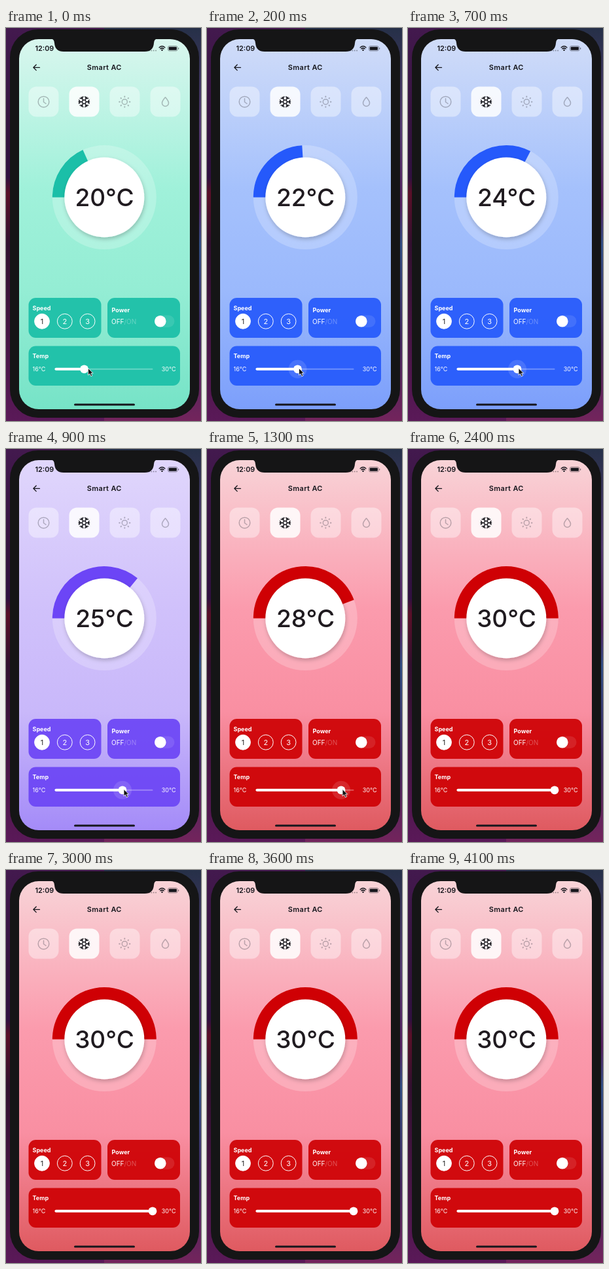
Write an HTML page that moves like this. It is 298x600 px and loops after 4.2 s.

```html
<!DOCTYPE html>
<html lang="en">
<head>
<meta charset="utf-8">
<title>Smart AC</title>
<style>
html, body { margin: 0; width: 100%; height: 100%; overflow: hidden; background: #241030; }
svg { display: block; width: 298px; height: 600px; font-family: Inter, Roboto, sans-serif; --main: #1bbfa8; }
.main { fill: var(--main); }
.card { fill: var(--main); fill-opacity: .92; }
.line { fill: none; stroke-linecap: round; stroke-linejoin: round; }
.bold { font-weight: 700; }
.mid { text-anchor: middle; }
.white { fill: #fff; }
.icon { stroke: #3c3c46; stroke-opacity: .34; stroke-width: 1.5; }
</style>
</head>
<body>
<svg viewBox="0 0 298 600">
  <defs>
    <linearGradient id="left" x2="0" y2="1">
      <stop offset="0" stop-color="#43194e"/><stop offset=".25" stop-color="#35133f"/>
      <stop offset=".38" stop-color="#301040"/><stop offset=".42" stop-color="#5a1028"/>
      <stop offset=".55" stop-color="#32102f"/><stop offset="1" stop-color="#5a1958"/>
    </linearGradient>
    <linearGradient id="right" x2="0" y2="1">
      <stop offset="0" stop-color="#263048"/><stop offset=".25" stop-color="#51386f"/>
      <stop offset=".45" stop-color="#54205f"/><stop offset=".55" stop-color="#304d82"/>
      <stop offset=".8" stop-color="#41255c"/><stop offset="1" stop-color="#73245c"/>
    </linearGradient>
    <linearGradient id="sky" x2="0" y2="1">
      <stop offset="0"/><stop offset=".4"/><stop offset=".68"/><stop offset="1"/>
    </linearGradient>
    <filter id="shadow" x="-20%" y="-20%" width="140%" height="140%">
      <feDropShadow dx="1" dy="3" stdDeviation="3" flood-opacity=".22"/>
    </filter>
  </defs>

  <!-- Desktop and phone -->
  <rect width="150" height="600" fill="url(#left)"/>
  <rect x="150" width="148" height="600" fill="url(#right)"/>
  <rect x="6" y="2" width="289" height="593" rx="43" fill="#151516"/>
  <rect x="20" y="17" width="261" height="565" rx="30" fill="url(#sky)"/>
  <path d="M68 16Q74 17 74 23Q75 36 88 36H212Q225 36 226 23Q226 17 232 16Z" fill="#151516"/>

  <!-- Status bar -->
  <g fill="#16161c">
    <text x="44.500" y="35" font-size="10.800" font-weight="600">12:09</text>
    <path d="M218 34.500h12" stroke="#16161c" stroke-opacity=".45" stroke-width="1.700" stroke-dasharray="1.700 1.700"/>
    <path class="line" d="M234.200 29.700Q238.500 25.900 242.800 29.700M235.900 31.700Q238.500 29.500 241.100 31.700" stroke="#16161c" stroke-width="1.500"/>
    <circle cx="238.500" cy="33.700" r="1.200"/>
    <rect x="247.500" y="27.500" width="14.500" height="7.500" rx="2.200" fill="none" stroke="#16161c" stroke-opacity=".5" stroke-width=".8"/>
    <rect x="248.700" y="28.700" width="12.100" height="5.100" rx="1"/>
    <rect x="263" y="30" width="1.200" height="2.600" rx=".6" fill-opacity=".5"/>
    <text class="mid" x="150.300" y="64.300" font-size="11" font-weight="600" letter-spacing=".35">Smart AC</text>
    <path class="line" d="M51.500 60.300H42M46.200 56L41.900 60.300L46.200 64.600" stroke="#16161c" stroke-width="1.300"/>
    <rect x="104" y="573.500" width="93" height="3" rx="1.500"/>
  </g>

  <g id="tiles" class="white"></g>
  <g class="line icon">
    <circle cx="57.500" cy="112.700" r="8.300"/><path d="M57.500 107.700V113L61 115.500"/>
    <circle cx="181.300" cy="112.700" r="4"/>
    <path id="rays" stroke-width="2"/>
    <path d="M243.500 105.800Q238.500 111.500 238.500 114.500A5 5 0 0 0 248.500 114.500Q248.500 111.500 243.500 105.800Z"/>
  </g>
  <path id="flake" class="line" stroke="#16161c" stroke-width="1.400"/>

  <!-- Dial -->
  <circle cx="150.300" cy="258.500" r="70" fill="none" stroke="#fff" stroke-opacity=".22" stroke-width="19"/>
  <path id="arc" fill="none" stroke="var(--main)" stroke-width="19"/>
  <circle cx="150.300" cy="258.500" r="61" class="white" filter="url(#shadow)"/>
  <text id="degrees" class="mid" x="150.500" y="271.500" font-size="37" font-weight="500" fill="#201b20"></text>

  <!-- Controls -->
  <rect class="card" x="34.500" y="412" width="111" height="61" rx="11"/>
  <rect class="card" x="155" y="412" width="111" height="61" rx="11"/>
  <rect class="card" x="34.500" y="485.500" width="231.500" height="60.500" rx="11"/>
  <g class="white" font-size="9">
    <text class="bold" x="40.500" y="431">Speed</text>
    <text class="bold" x="161.500" y="433.500">Power</text>
    <text class="bold" x="40.500" y="504">Temp</text>
    <text x="161" y="451.500" font-size="10">OFF<tspan fill-opacity=".3">/ON</tspan></text>
    <text x="40.500" y="524">16°C</text>
    <text x="259.500" y="524" text-anchor="end">30°C</text>
    <rect x="227" y="438.500" width="30.500" height="18.500" rx="9.250" fill-opacity=".1"/>
    <circle cx="235.800" cy="447.800" r="8.800"/>
  </g>
  <g id="speeds" class="mid" font-size="11"></g>

  <path class="line" d="M75 520.800H223.500" stroke="#fff" stroke-opacity=".3" stroke-width="2"/>
  <path id="fill" class="line" stroke="#fff" stroke-width="4"/>
  <circle id="halo" cy="520.800" r="14" class="white" fill-opacity=".13"/>
  <circle id="knob" cy="520.800" r="6.400" class="white"/>
  <path id="cursor" d="M0 0V10.500L2.500 8.300L4.400 12.300L6.300 11.400L4.500 7.500H7.700Z" fill="#111" stroke="#fff" stroke-width=".8"/>
</svg>
<script>
const $ = id => document.getElementById(id);
const svg = document.querySelector('svg');
const stops = document.querySelectorAll('#sky stop');
const LOOP = 4200, MIN_X = 75, MAX_X = 224;

// Lowest temperature, accent, background from top to bottom
const themes = [
  [16, '#1bbfa8', '#d9f6ee', '#a0f1da', '#94edd4', '#76e3c7'],
  [21, '#2559fb', '#d0dcf8', '#a5c1fc', '#9bb9fc', '#7c9ffb'],
  [25, '#6c45f6', '#e0d6fc', '#d0c1fb', '#c9b8fa', '#a48bf8'],
  [28, '#cf0004', '#f8d3d7', '#fb9bad', '#f98fa2', '#df5a60']
];

// Time and slider position of each drag step
const drag = [
  [0, 119.5], [200, 138.5], [300, 144], [400, 149], [500, 154], [600, 160], [700, 167],
  [900, 178], [1000, 184], [1200, 197], [1300, 205], [1500, 212], [1600, 217],
  [1800, 222], [1900, 224]
];

const polar = (cx, cy, r, deg) => {
  const a = deg * Math.PI / 180;
  return `${(cx + r * Math.cos(a)).toFixed(2)} ${(cy + r * Math.sin(a)).toFixed(2)}`;
};
const around = (n, make) => Array.from({ length: n }, (_, i) => make(i * 360 / n)).join('');

$('tiles').innerHTML = [35, 97, 159, 221].map((x, i) =>
  `<rect x="${x - .5}" y="89.500" width="46" height="46" rx="12" fill-opacity="${i === 1 ? .86 : .4}"/>`).join('');
$('rays').setAttribute('d', around(8, a =>
  `M${polar(181.3, 112.7, 7.5, a)}L${polar(181.3, 112.7, 8.1, a)}`));

const flake = (r, a) => polar(119.3, 112.7, r, a);
$('flake').setAttribute('d', around(6, a =>
  `M${flake(3.2, a)}L${flake(3.2, a + 60)}M${flake(3.2, a)}L${flake(8.3, a)}` +
  `M${flake(8.2, a - 19)}L${flake(5.8, a)}L${flake(8.2, a + 19)}`));

$('speeds').innerHTML = [1, 2, 3].map(n => {
  const x = 20.2 + 34.8 * n, on = n === 1;
  return `<circle cx="${x}" cy="447.800" r="11.400" fill="${on ? '#fff' : 'none'}" stroke="#fff"/>` +
    `<text x="${x}" y="451.800" fill="${on ? '#222' : '#fff'}">${n}</text>`;
}).join('');

function draw(now) {
  const t = now % LOOP;
  const x = drag.findLast(step => step[0] <= t)[1];
  const temp = Math.floor(16.1 + 14 * (x - MIN_X) / (MAX_X - MIN_X));
  const [, main, ...sky] = themes.findLast(theme => theme[0] <= temp);
  const sweep = 180 - 1.095 * (MAX_X - x);
  const held = t < 2400;

  svg.style.setProperty('--main', main);
  sky.forEach((color, i) => stops[i].setAttribute('stop-color', color));
  $('degrees').textContent = temp + '°C';
  $('arc').setAttribute('d',
    `M80.300 258.500A70 70 0 0 1 ${polar(150.3, 258.5, 70, 180 + sweep)}`);
  $('fill').setAttribute('d', `M76.500 520.800H${x}`);
  $('knob').setAttribute('cx', x);
  $('halo').setAttribute('cx', x);
  $('halo').style.display = held && t >= 200 ? '' : 'none';
  $('cursor').style.display = held ? '' : 'none';
  $('cursor').setAttribute('transform', `translate(${x + (t < 200 ? 6 : 2)} 519.500)`);
}

const start = performance.now();
function tick() {
  draw(performance.now() - start);
  requestAnimationFrame(tick);
}
tick();
</script>
</body>
</html>
```
